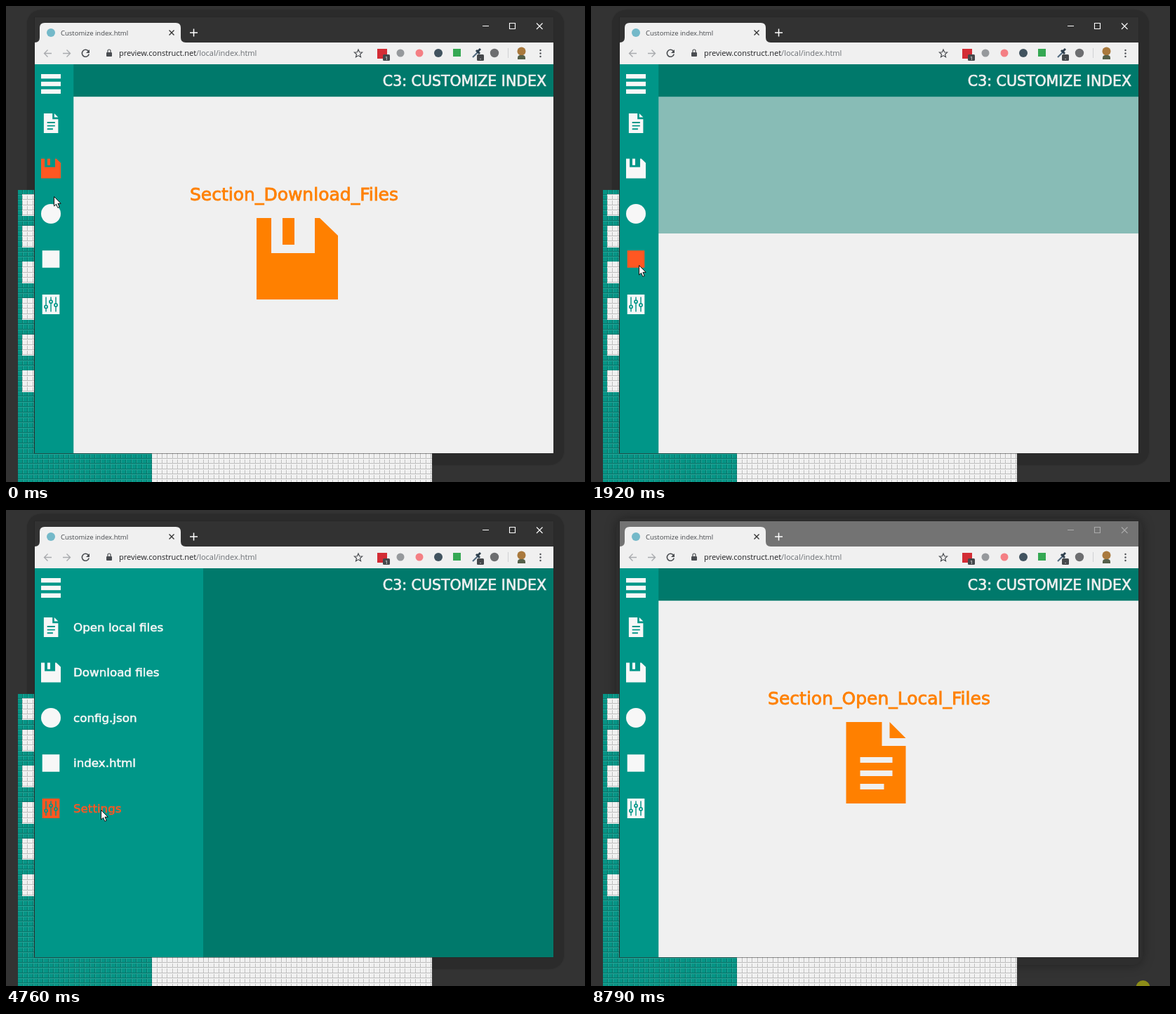
An HTML page with a canvas that plays this animation: 825x678 px, repeating every 8.86 s.

```html
<!DOCTYPE html>
<html lang="en">
<head>
<meta charset="utf-8">
<title>Customize index.html</title>
<style>
  html, body { margin: 0; width: 100%; height: 100%; overflow: hidden; background: #333; }
  canvas { display: block; }
</style>
</head>
<body>
<canvas id="stage" width="825" height="678"></canvas>
<script>
const ctx = document.getElementById('stage').getContext('2d');
const LOOP = 8860;
const TEAL = '#009688', DARK_TEAL = '#00796b', PAPER = '#f0f0f0';
const ORANGE = '#ff8000', HOVER = '#ff5722', CHROME = '#323232', SLATE = '#4a4d51';
const WIDE = '"DejaVu Sans", sans-serif', UI = '"Open Sans", sans-serif';

const clamp = v => Math.max(0, Math.min(1, v));
const smooth = v => (v = clamp(v), v * v * (3 - 2 * v));

// Icons live in a box of 116 units centred on the origin.
const slider = (x, y) =>
  `M${x - 3}-44h6V${y - 12}h-6zM${x - 3} ${y + 12}h6V44h-6z` +
  `M${x - 12} ${y}a12 12 0 1 0 24 0a12 12 0 1 0-24 0z` +
  `M${x - 5} ${y}a5 5 0 1 0 10 0a5 5 0 1 0-10 0z`;
const items = [
  { label: 'Open local files', section: 'Section_Open_Local_Files', dx: -9.5,
    path: 'M-42-58H9V-24H43V58H-42zM20-58L43-35H20zM-22-8H24V0H-22zM-22 11H24V19H-22zM-22 30H12V38H-22z' },
  { label: 'Download files', section: 'Section_Download_Files', dx: 0,
    path: 'M-58-58H-37V-8H25V-58H32L58-33V58H-58zM-21-58H-4V-20H-21z' },
  { label: 'config.json', section: 'Section_Config', dx: 0,
    path: 'M-58 0a58 58 0 1 0 116 0a58 58 0 1 0-116 0z' },
  { label: 'index.html', section: 'Section_Index', dx: 0,
    path: 'M-51-51H51V51H-51z' },
  { label: 'Settings', section: 'Section_Settings', dx: 0,
    path: 'M-51-58H51V58H-51z' + slider(-29, 14) + slider(0, -16) + slider(29, 4) }
].map(item => ({ ...item, path: new Path2D(item.path) }));

// Click time and the item it opens.
const visits = [[330, 2], [1747, 3], [4330, 4], [5963, 0]];
const GROW = 400, SHRINK_START = 490;

// Pointer stops: time, x, y.
const stops = [
  [20, 68, 271], [280, 71, 292], [980, 71, 292], [1510, 68, 369], [2200, 68, 369],
  [2690, 84, 222], [3040, 67, 113], [3600, 67, 113], [4220, 135, 436], [4480, 135, 450],
  [4700, 135, 427], [5230, 135, 427], [5800, 137, 163], [6880, 137, 163],
  [7260, 67, 113], [7940, 67, 113], [8340, 650, 695]
];

function pointerAt(t) {
  const next = stops.findIndex(s => s[0] > t);
  if (next < 0) return stops[stops.length - 1].slice(1);
  if (next === 0) return stops[0].slice(1);
  const [t0, x0, y0] = stops[next - 1], [t1, x1, y1] = stops[next];
  const k = smooth((t - t0) / (t1 - t0));
  return [x0 + (x1 - x0) * k, y0 + (y1 - y0) * k];
}

function pageAt(t) {
  let section = 1, cover = 0;
  for (const [start, id] of visits) {
    const u = t - start;
    if (u < 0) break;
    cover = clamp(Math.min(u, SHRINK_START + GROW - u) / GROW);
    section = u < GROW ? -1 : id;
  }
  return { section, cover };
}

function rect(x, y, w, h, color) {
  ctx.fillStyle = color;
  ctx.fillRect(x, y, w, h);
}
function round(x, y, w, h, r, color) {
  ctx.fillStyle = color;
  ctx.beginPath();
  ctx.roundRect(x, y, w, h, r);
  ctx.fill();
}
function disc(x, y, r, color) {
  ctx.fillStyle = color;
  ctx.beginPath();
  ctx.arc(x, y, r, 0, 7);
  ctx.fill();
}
function shape(d, color) {
  ctx.fillStyle = color;
  ctx.fill(new Path2D(d));
}
function line(d, color, width = 1) {
  ctx.strokeStyle = color;
  ctx.lineWidth = width;
  ctx.stroke(new Path2D(d));
}
function text(s, x, y, size, color, family = UI, align = 'left') {
  ctx.font = `${size}px ${family}`;
  ctx.textAlign = align;
  ctx.fillStyle = color;
  ctx.fillText(s, x, y);
  if (family === WIDE) {
    ctx.strokeStyle = color;
    ctx.lineWidth = size / 30;
    ctx.strokeText(s, x, y);
  }
}
function icon(item, x, y, size, color) {
  ctx.save();
  ctx.translate(x, y);
  ctx.scale(size / 116, size / 116);
  ctx.fillStyle = color;
  ctx.fill(item.path, 'evenodd');
  ctx.restore();
}

function tiles(x, y, w, h, color, grid, shine) {
  const cell = 7.37;
  rect(x, y, w, h, color);
  const lines = (from, origin, to, draw) => {
    const first = origin + Math.ceil((from - origin) / cell) * cell;
    for (let p = first; p < to; p += cell) draw(Math.round(p));
  };
  lines(x, 23, x + w, p => { rect(p, y, 1, h, grid); rect(p + 1, y, 1, h, shine); });
  lines(y, 268, y + h, p => { rect(x, p, w, 1, grid); rect(x, p + 1, w, 1, shine); });
}

function backdrop(focused) {
  rect(0, 0, 825, 678, '#333');
  ctx.save();
  ctx.shadowColor = focused ? 'rgba(0,0,0,.15)' : 'rgba(0,0,0,.35)';
  ctx.shadowBlur = focused ? 2 : 16;
  if (focused) round(30, 5.5, 765, 648, 20, '#2b2b2b');
  else round(36, 12, 750, 636, 14, '#2e2e2e');
  ctx.restore();

  const white = ['#f0f0f0', '#bcbcbc', '#f7f7f7'];
  tiles(17, 262, 191, 416, '#069485', '#087368', '#25a598');
  tiles(208, 637, 399, 41, ...white);
  for (const y of [268, 313, 364, 416, 468, 519]) tiles(23, y, 18, 30, ...white);
}

function browser(focused) {
  const control = focused ? '#fff' : '#aaa';
  rect(40, 15.5, 740.5, 622, '#262626');
  rect(41, 16, 739, 36, focused ? CHROME : '#737373');
  shape('M41 52Q48 52 48 45V31Q48 24 55 24H242Q249 24 249 31V45Q249 52 256 52z', PAPER);
  rect(41, 52, 739, 31, PAPER);

  disc(64, 38, 6, '#74b9c9');
  text('Customize index.html', 78, 41.5, 9.5, '#44474b');
  line('M232.5 34.5l7 7m0-7l-7 7', '#333', 1.4);
  line('M262 38h11M267.5 32.5v11', '#fff', 1.5);
  line('M679 28.5h9M717.5 24.5h8v8h-8zM756 24.5l8.5 8.5m0-8.5l-8.5 8.5', control, 1.1);

  line('M65 67.5H54.5m5-5l-5 5l5 5M81 67.5H91.5m-5-5l5 5l-5 5', '#a9abae', 1.4);
  line('M117.5 64.5a5 5 0 1 0 .7 4', SLATE, 1.6);
  shape('M119 62v5h-5z', SLATE);
  round(143, 66, 8, 6, 1, SLATE);
  line('M145 66v-2a2 2 0 0 1 4 0v2', SLATE, 1.2);
  const host = 'preview.construct.net';
  text(host, 161, 71, 11, '#202124');
  text('/local/index.html', 161 + ctx.measureText(host).width, 71, 11, '#6b6f74');
  line('M502 62l1.6 3.8l4 .3l-3.1 2.7l1 4l-3.5-2.2l-3.5 2.2l1-4l-3.1-2.7l4-.3z', SLATE, 1.2);

  rect(529, 61, 14, 14, '#d32d35');
  disc(562, 67, 5.5, '#96999c');
  disc(589, 67, 5.5, '#f47f84');
  disc(616, 67, 6, '#41535f');
  rect(637, 61, 11, 11, '#35a853');
  line('M665 73l7-7', '#536b80', 2.2);
  line('M670 63l5 5m-2-4l3-3', '#2d3e4c', 3);
  disc(696, 67, 6.2, '#6d6e70');
  for (const [x, s] of [[537, '1'], [671, '-']]) {
    round(x, 69, 10, 9, 1.5, '#45484b');
    text(s, x + 5, 77, 8, '#fff', UI, 'center');
  }
  rect(715, 60, 1, 14, '#cfd1d3');
  disc(734.5, 64.5, 6, '#a9793d');
  round(729, 70, 11, 6, [4, 4, 0, 0], '#55604a');
  for (const y of [63, 67.5, 72]) disc(761.5, y, 1.2, SLATE);
}

function page(t, px, py) {
  const { section, cover } = pageAt(t);
  rect(41, 83, 739, 554, PAPER);
  if (section >= 0) {
    const item = items[section];
    text(item.section, 410.5, 277, 25, ORANGE, WIDE, 'center');
    icon(item, 415 + item.dx, 360, 116, ORANGE);
  }
  ctx.globalAlpha = cover;
  rect(41, 83, 739, 554 * cover, DARK_TEAL);
  ctx.globalAlpha = 1;
  rect(41, 83, 739, 46.2, DARK_TEAL);
  text('C3: CUSTOMIZE INDEX', 770, 114, 20.5, PAPER, WIDE, 'right');

  const open = t < 7590 ? smooth((t - 3080) / 230) : 0;
  const width = 55.5 + 184.5 * open;
  const inside = px < 41 + width;
  ctx.save();
  ctx.beginPath();
  ctx.rect(41, 83, width, 554);
  ctx.clip();
  rect(41, 83, width, 554, TEAL);
  const onBurger = inside && py > 83 && py < 143;
  for (const y of [97, 107.8, 118.6]) rect(50, y, 28, 6.4, onBurger ? HOVER : '#f7f7f7');
  const hovered = inside ? Math.floor((py - 143) / 64.5) : -1;
  items.forEach((item, i) => {
    const y = 167 + 64.5 * i, color = i === hovered ? HOVER : '#f7f7f7';
    icon(item, 64, y, 28, color);
    if (open) text(item.label, 96, y + 5.5, 16.7, color, WIDE);
  });
  ctx.restore();
}

const arrow = new Path2D('M.5.5V14l3-2.8l2.3 5.2l2.4-1l-2.3-5.1h4.3z');
function pointer(x, y) {
  ctx.save();
  ctx.translate(x, y);
  ctx.fillStyle = '#fff';
  ctx.fill(arrow);
  ctx.strokeStyle = '#111';
  ctx.lineWidth = 1;
  ctx.stroke(arrow);
  ctx.restore();
}

function draw() {
  const t = performance.now() % LOOP;
  const focused = t < 8790;
  const [x, y] = pointerAt(t);
  backdrop(focused);
  browser(focused);
  page(t, x, y);
  if (focused) pointer(x, y);
  else disc(786.5, 680, 10, '#8c8c18');
  requestAnimationFrame(draw);
}
draw();
</script>
</body>
</html>
```
